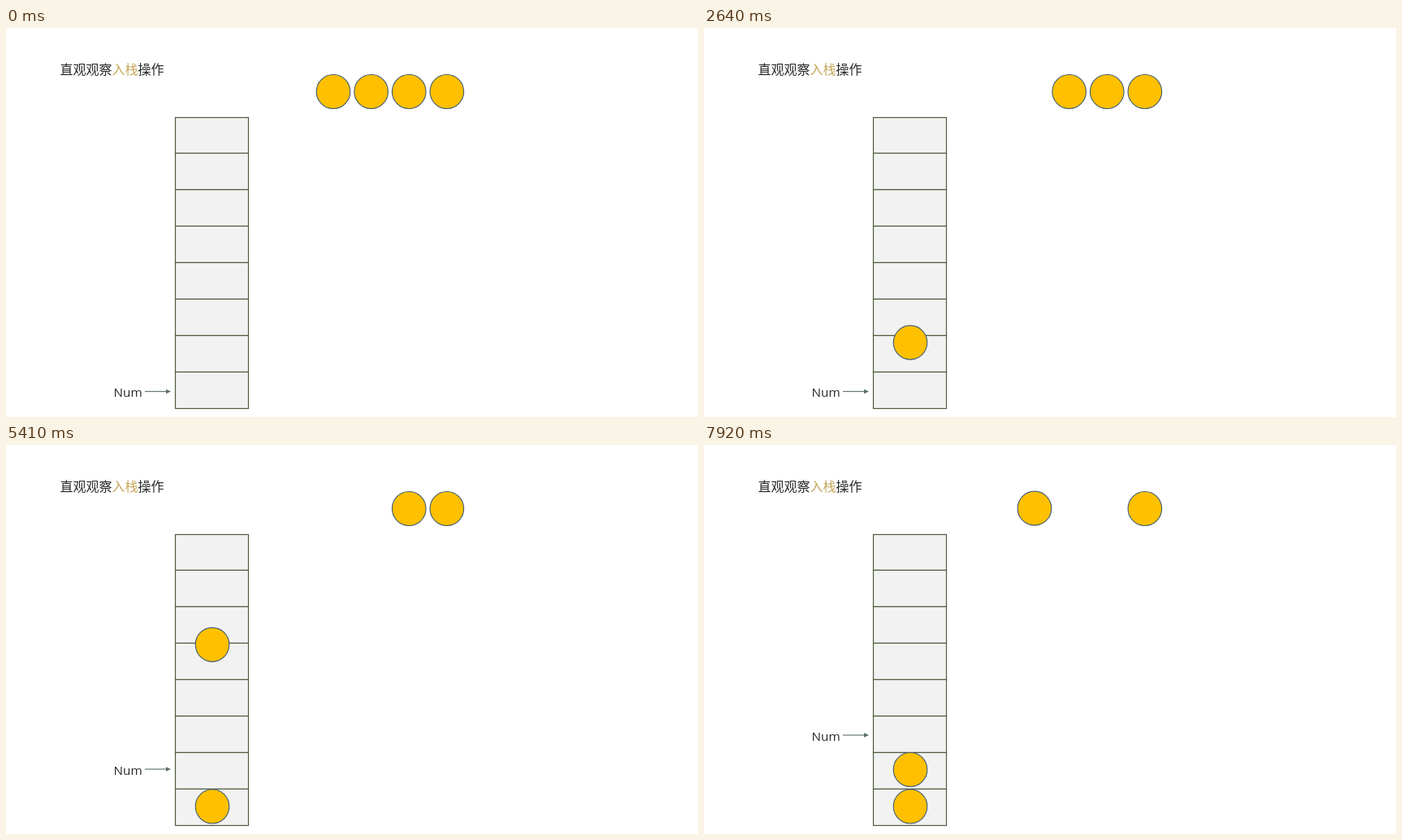
Animation of 852x480 px, one loop 8000 ms. Source, as an HTML page:

```html
<!DOCTYPE html>
<html lang="zh-CN">
<head>
<meta charset="utf-8">
<title>入栈操作</title>
<style>
  html, body { margin: 0; width: 100%; height: 100%; overflow: hidden; background: #fff; }
  svg { display: block; width: 852px; height: 480px; }
  .title { font: 16px "Noto Sans CJK SC", "Noto Sans CJK", sans-serif; fill: #262a26; }
  .title tspan { fill: #c5a55a; }
  .num { font: 15.3px "Open Sans", "Noto Sans", sans-serif; fill: #262626; }
  .cells { fill: #f2f2f2; stroke: #4e5a3c; stroke-width: 1.2; }
  .balls { fill: #ffc000; stroke: #3f5b70; stroke-width: 1.1; }
</style>
</head>
<body>
<svg viewBox="0 0 852 480">
  <text class="title" x="66.5" y="56.5">直观观察<tspan>入栈</tspan>操作</text>
  <g class="cells" id="cells"></g>
  <g id="pointer">
    <text class="num" x="132.5" y="6.5">Num</text>
    <path d="M171 0H199" stroke="#65786f" stroke-width="1.2"/>
    <path d="M197 -2.8L203 0L197 2.8Z" fill="#5c6c72"/>
  </g>
  <g class="balls" id="balls"></g>
</svg>
<script>
const LOOP = 8000;
const STACK_X = 254, TOP_Y = 77.5, QUEUE_Y = 78.5;
const FALL = 1800, LIFT = 500;
const PAUSE_START = 1870, PAUSE = 308;

const add = (id, tag, attrs) => {
  const el = document.createElementNS("http://www.w3.org/2000/svg", tag);
  for (const key in attrs) el.setAttribute(key, attrs[key]);
  return document.getElementById(id).appendChild(el);
};

const edge = i => Math.floor(110 + 44.9 * i) + 0.5;
for (let i = 0; i < 8; i++)
  add("cells", "rect", { x: 208.5, y: edge(i), width: 90, height: edge(i + 1) - edge(i) });

const queueX = i => 403 + 46.6 * i;
const restY = i => 446 - 45.5 * i;
const balls = Array.from({ length: 4 }, () => add("balls", "ellipse", { rx: 20.8, ry: 21 }));
const pointer = document.getElementById("pointer");

// Eased progress, 0 to 1
const ease = (t, start, length) => {
  const u = Math.min(1, Math.max(0, (t - start) / length));
  return (1 - Math.cos(Math.PI * u)) / 2;
};
const mix = (a, b, p) => a + (b - a) * p;

function place(i, slide = 0, fall = 0) {
  balls[i].setAttribute("cx", mix(queueX(i), STACK_X, slide));
  balls[i].setAttribute("cy", mix(mix(QUEUE_Y, TOP_Y, slide), restY(i), fall));
}

function draw(t) {
  // The first fall hangs briefly halfway.
  const fallTime = t - Math.min(PAUSE, Math.max(0, t - PAUSE_START));
  place(0, ease(t, 0, 980), ease(fallTime, 1000, FALL));
  place(1, ease(t, 3180, 1270), ease(t, 4485, FALL));
  place(2, ease(t, 7215, 1700));
  place(3);

  const y = 448.5 - 48.5 * ease(t, 3100, LIFT) - 42 * ease(t, 6285, LIFT);
  pointer.setAttribute("transform", `translate(0 ${y})`);
}

const begin = performance.now();
function loop() {
  draw((performance.now() - begin) % LOOP);
  requestAnimationFrame(loop);
}
loop();
</script>
</body>
</html>
```
